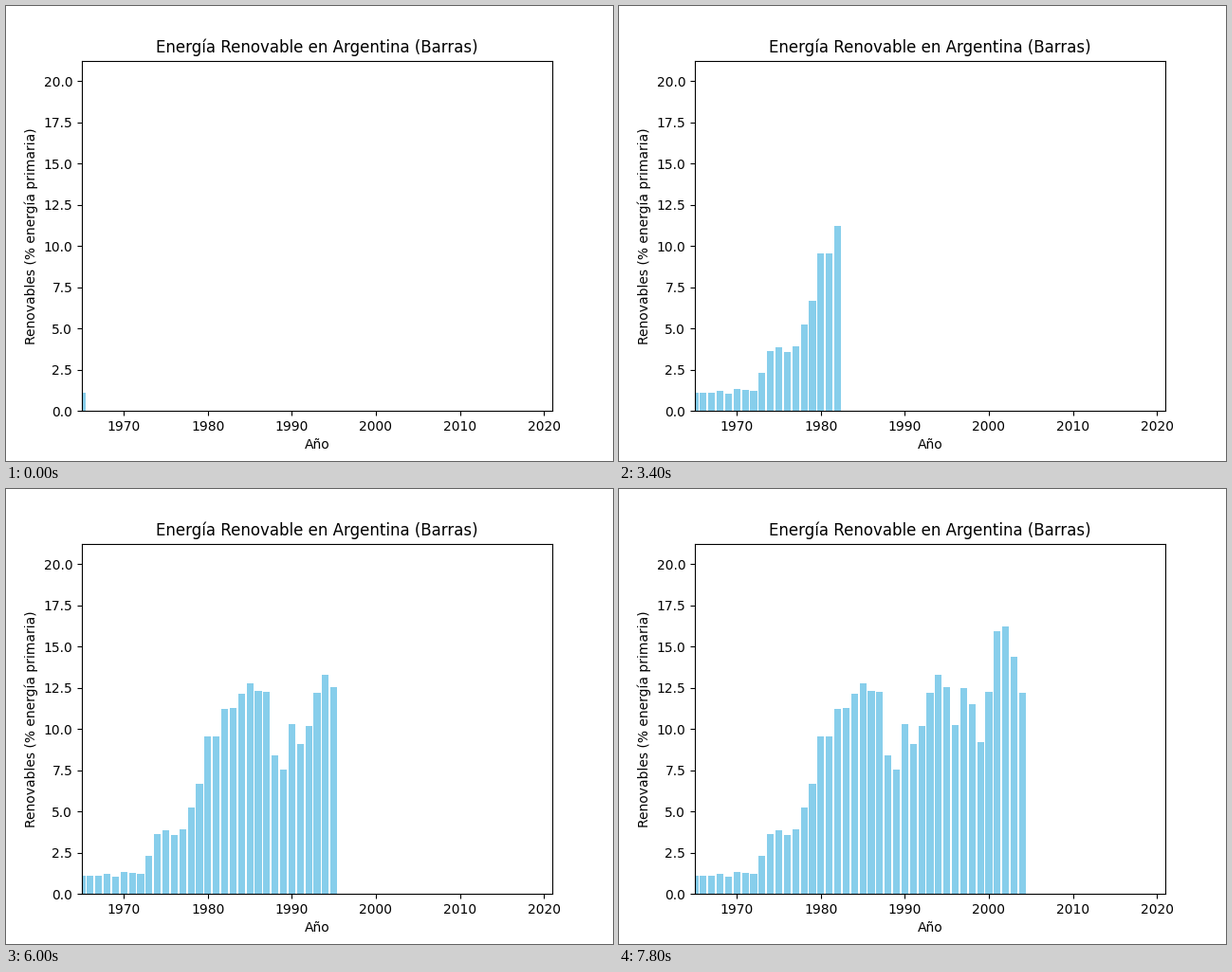
Animation, 640 px wide and 480 px high, one loop 8000 ms. Source, as a matplotlib script:

```python
import matplotlib.pyplot as plt
from matplotlib.animation import FuncAnimation

START, END = 1965, 2021
SHARE = [
    1.1, 1.1, 1.1, 1.2, 1.05, 1.33, 1.27, 1.2, 2.3, 3.62,
    3.87, 3.56, 3.92, 5.24, 6.67, 9.55, 9.53, 11.2, 11.27, 12.13,
    12.77, 12.32, 12.25, 8.4, 7.53, 10.3, 9.1, 10.2, 12.2, 13.3,
    12.53, 10.25, 12.48, 11.5, 9.2, 12.25, 15.93, 16.2, 14.4, 12.2,
]

fig, ax = plt.subplots(figsize=(6.4, 4.8), dpi=100)
years = range(START, START + len(SHARE))
bars = ax.bar(years, SHARE, color="skyblue")
ax.set_xlim(START, END)
ax.set_ylim(0, 21.23)
ax.set_title("Energía Renovable en Argentina (Barras)")
ax.set_xlabel("Año")
ax.set_ylabel("Renovables (% energía primaria)")


def update(frame):
    """Show one more year with every step."""
    for i, bar in enumerate(bars):
        bar.set_visible(i <= frame)
    return list(bars)


anim = FuncAnimation(fig, update, frames=len(SHARE), interval=200,
                     init_func=lambda: update(0), repeat=True, repeat_delay=0)
plt.show()
```
